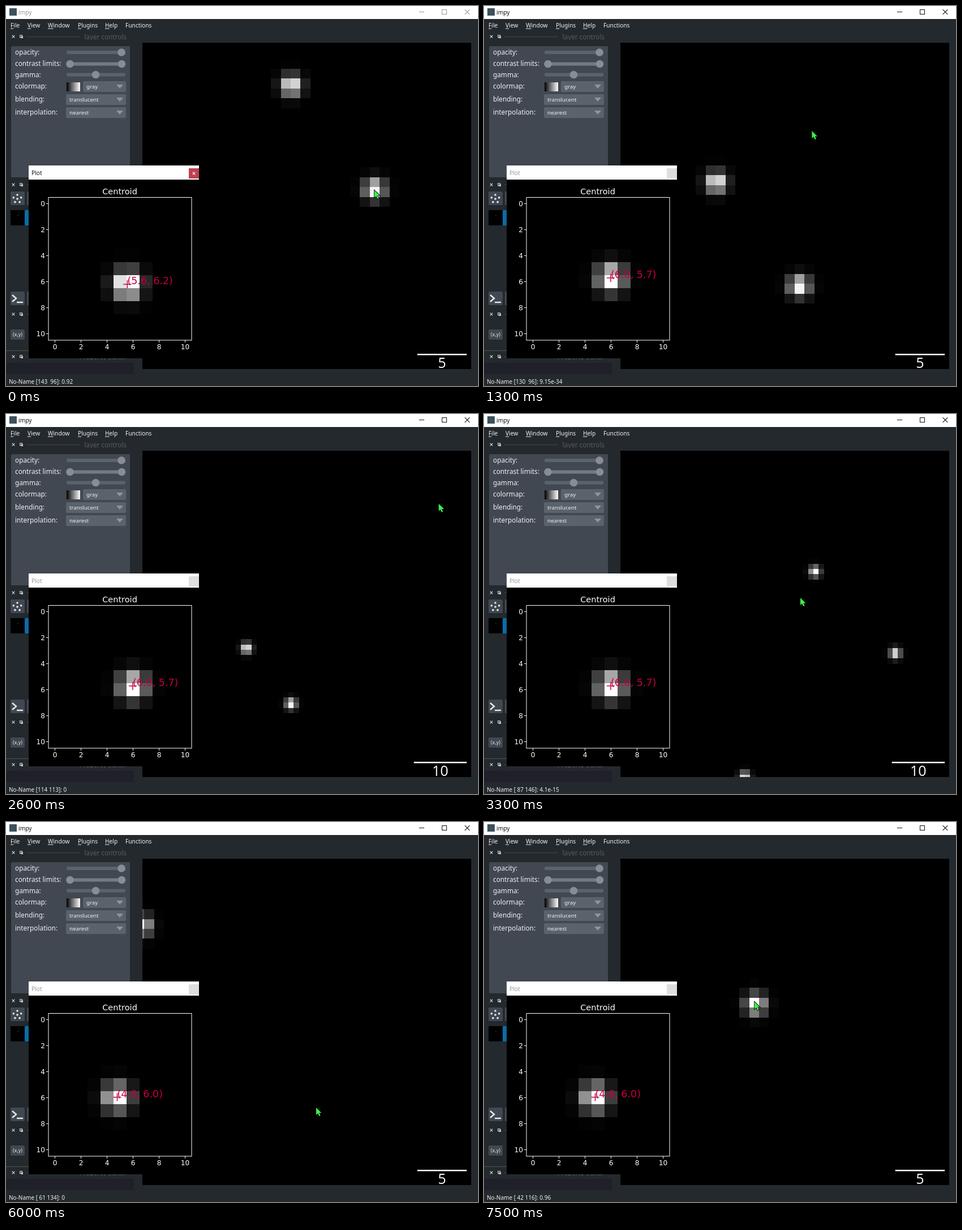
These frames come from a looping animation (834x672 px, 7600 ms). An HTML page with a canvas:

```html
<!DOCTYPE html>
<html lang="en">
<head>
<meta charset="utf-8">
<title>Centroid viewer</title>
<style>
html, body { margin: 0; width: 100%; height: 100%; overflow: hidden; background: #24292e; }
canvas { display: block; }
</style>
</head>
<body>
<canvas id="stage" width="834" height="672"></canvas>
<script>
const g = document.getElementById('stage').getContext('2d');
const LOOP = 7600, CENTER_X = 532, CENTER_Y = 353, NEAR = 17.45, FAR = 9.33;
const UI = '"Noto Sans", sans-serif', PLOT = '"DejaVu Sans", sans-serif';
const BG = '#24292e', PANEL = '#414851', FIELD = '#5a626c', KNOB = '#868e93';

// Gaussian spots: row, column
const spots = {
  a: [132.2, 87.56], b: [142.71236, 95.97774], d: [81.962, 148.7834],
  e: [97.5, 164], f: [120.95, 135.45], h: [42.143, 116.143]
};
// Plot updates: start, spot, crop origin, console message
const plots = [
  { at: 0, spot: spots.a, row: 126, col: 82 },
  { at: 400, spot: spots.b, row: 137, col: 90, until: 900,
    message: "'func' returned (5.71236063632516, 5.977741071187531)" },
  { at: 4500, spot: spots.d, row: 76, col: 144, until: 4650,
    message: "'func' returned (5.96200418273651, 4.783402917365284)" }
];

// The view follows from the user's gestures: x, y is the pointer,
// col, row the cell at the viewer's centre, density the cells per pixel
const now = { t: 0, x: 651, y: 326, col: 89.16, row: 144.38, density: 1 / NEAR };
const keys = [{ ...now }];

function gesture(start, end, change) {
  keys.push({ ...now, t: start });
  keys.push({ ...Object.assign(now, change, { t: end }) });
}

const move = (start, end, x, y) => gesture(start, end, { x, y });

function zoom(start, end, scale) {
  const shift = now.density - 1 / scale;
  gesture(start, end, {
    density: 1 / scale,
    col: now.col + (now.x - CENTER_X) * shift,
    row: now.row + (now.y - CENTER_Y) * shift
  });
}

// Equal strokes, each dragging the image by dx, dy and ending at x, y
function pan(start, end, x, y, dx, dy, strokes) {
  const step = (end - start) / strokes / 2;
  for (let t = start; t < end; t += 2 * step) {
    move(t, t + step, x - dx, y - dy);
    gesture(t + step, t + 2 * step, {
      x, y, col: now.col - dx * now.density, row: now.row - dy * now.density
    });
  }
}

pan(800, 1650, 552, 271, -93.7, 171, 2);
move(1700, 1900, 549, 336);
zoom(2000, 2400, FAR);
pan(2400, 3200, 559, 325, -205.6, 166.3, 2);
move(3300, 3400, 559, 322);
zoom(3400, 3900, NEAR);
move(3900, 4250, 611, 241);
move(4450, 4650, 429, 202);
pan(4800, 5800, 548, 505, 100.2, 318.8, 2);
pan(6050, 6700, 561, 389, 241.7, 139.1, 1);
move(6700, 7300, 478, 318);

function stateAt(t) {
  const i = keys.findIndex(k => k.t > t);
  if (i < 1) return i < 0 ? now : keys[0];
  const a = keys[i - 1], b = keys[i];
  const u = (t - a.t) / (b.t - a.t), e = u * u * (3 - 2 * u);
  return Object.fromEntries(Object.keys(a).map(k => [k, a[k] + (b[k] - a[k]) * e]));
}

const intensity = ([r, c], row, col) => Math.exp(-((row - r) ** 2) - (col - c) ** 2);

function box(x, y, w, h, color) {
  g.fillStyle = color;
  g.fillRect(x, y, w, h);
}

function text(s, x, y, size, color = '#f0f1f2', align = 'left', font = UI) {
  g.font = `${size}px ${font}`;
  g.fillStyle = color;
  g.textAlign = align;
  g.fillText(s, x, y);
}

function path(points, color, width = 1) {
  g.beginPath();
  points.forEach(([x, y]) => g.lineTo(x, y));
  g.strokeStyle = color;
  g.lineWidth = width;
  g.stroke();
}

function disc(x, y, r, color) {
  g.fillStyle = color;
  g.beginPath();
  g.arc(x, y, r, 0, 7);
  g.fill();
}

function cross(x, y, r, color, width) {
  path([[x - r, y - r], [x + r, y + r]], color, width);
  path([[x + r, y - r], [x - r, y + r]], color, width);
}

function rounded(x, y, w, h, color, r = 2) {
  g.fillStyle = color;
  g.beginPath();
  g.roundRect(x, y, w, h, r);
  g.fill();
}

// Cells around a spot; place(row, col) gives a cell's centre
function drawCells(spot, size, gain, place) {
  const r0 = Math.round(spot[0]), c0 = Math.round(spot[1]);
  for (let r = r0 - 3; r <= r0 + 3; r++) for (let c = c0 - 3; c <= c0 + 3; c++) {
    const v = Math.min(255, Math.round(255 * gain * intensity(spot, r, c)));
    if (v < 2) continue;
    const [x, y] = place(r, c), h = size / 2;
    const x0 = Math.round(x - h), y0 = Math.round(y - h);
    box(x0, y0, Math.round(x + h) - x0, Math.round(y + h) - y0, `rgb(${v},${v},${v})`);
  }
}

function drawTitleBar(active) {
  const ink = active ? '#111' : '#999';
  box(0, 0, 834, 23, '#fff');
  box(6, 4, 13, 13, '#3b525c');
  text('impy', 22, 15, 10.2, ink);
  path([[730, 10.5], [739, 10.5]], ink);
  g.strokeRect(770.5, 6.5, 8, 8);
  cross(815, 10.5, 4.3, ink, 1.1);
}

function drawDockHeader(y, title) {
  cross(13, y, 2.3, '#d5d7d9', 1.2);
  g.strokeStyle = '#c5c8ca';
  g.lineWidth = 1;
  g.strokeRect(24.5, y - 2.5, 4, 4);
  g.strokeRect(26.5, y - 0.5, 3, 3);
  path([[36, y + 0.5], [131, y + 0.5]], '#3e454d');
  if (title) {
    text(title, 213, y + 5, 11.7, '#565c63', 'right');
    box(130, y + 6, 90, 5, BG);
  }
}

function drawCombo(x, y, label) {
  rounded(x, y, 212 - x, 19, FIELD);
  text(label, x + 6, y + 12.5, 9.7);
  g.fillStyle = '#8d969d';
  g.beginPath();
  g.moveTo(195, y + 6);
  g.lineTo(207, y + 6);
  g.lineTo(201, y + 13);
  g.fill();
}

function drawSlider(y, color, ...knobs) {
  rounded(107, y - 3, 104, 6, color);
  knobs.forEach(x => disc(x, y, 6.8, KNOB));
}

function drawMenu() {
  [['File', 8], ['View', 38], ['Window', 74], ['Plugins', 127], ['Help', 175], ['Functions', 211]]
    .forEach(([label, x], i) => {
      text(label, x, 38, 10.2);
      if (i < 5) box(x, 39.5, g.measureText(label[0]).width, 1, '#f0f1f2');
    });
}

function drawLayerControls() {
  drawDockHeader(54, 'layer controls');
  rounded(9, 71, 210, 232, PANEL);
  ['opacity:', 'contrast limits:', 'gamma:', 'colormap:', 'blending:', 'interpolation:']
    .forEach((s, i) => text(s, 16, 86 + 20 * i + 3 * Math.max(0, i - 3), 11.8));
  drawSlider(82, FIELD, 204);
  drawSlider(102.5, '#727b84', 113, 204.5);
  drawSlider(121.5, FIELD, 158.5);
  const ramp = g.createLinearGradient(107, 0, 131, 0);
  ramp.addColorStop(0, '#000');
  ramp.addColorStop(1, '#fff');
  box(107, 135, 24, 16, ramp);
  drawCombo(136, 133, 'gray');
  drawCombo(106, 156, 'translucent');
  drawCombo(106, 179, 'nearest');
}

function drawDocks() {
  const ink = '#e8eaeb';
  drawDockHeader(316);
  drawDockHeader(545);
  for (const y of [328, 505]) {
    rounded(8, y, 25, 24, PANEL);
    box(37, y, 4, 24, PANEL);
  }
  disc(20, 341, 1.8, ink);
  for (let a = -Math.PI / 2; a < 4; a += Math.PI * 0.4)
    disc(20 + 7 * Math.cos(a), 341 + 7 * Math.sin(a), 1.8, ink);
  box(8, 361, 25, 27, '#000');
  box(20, 370, 2, 1, '#444');
  box(33, 361, 8, 27, '#0b6ca6');
  path([[11, 511], [18, 517], [11, 523]], ink, 2.4);
  path([[19, 524], [30, 524]], ink, 2.4);
  rounded(8, 572, 25, 18, PANEL);
  text('(x,y)', 20.5, 584, 8.8, ink, 'center');
  box(0, 609, 41, 1, '#4a5a50');
  drawDockHeader(620, 'Property editor');
  box(0, 631, 226, 20, '#1f2029');
}

function drawViewer({ col, row, density }) {
  const scale = 1 / density;
  g.save();
  g.beginPath();
  g.rect(241, 65, 581, 577);
  g.clip();
  box(241, 65, 581, 577, '#000');
  for (const spot of Object.values(spots))
    drawCells(spot, scale, 1 / 0.96,
      (r, c) => [CENTER_X + (c - col) * scale, CENTER_Y + (r - row) * scale]);
  const units = scale > 13 ? 5 : 10, w = units * scale;
  box(814 - w, 615, w, 2.5, '#fff');
  text(units, 814 - w / 2, 639.5, 25, '#fff', 'center', '"Open Sans", sans-serif');
  g.restore();
}

function drawPlot({ spot, row, col }, active) {
  const px = c => 86.5 + 23 * c, py = r => 349.5 + 23 * r;
  box(40, 282, 301, 341, '#000');
  box(40, 282, 301, 25, '#fff');
  text('Plot', 45, 298.5, 10.2, active ? '#111' : '#999');
  box(323, 287, 18, 18, active ? '#bf4050' : '#dedede');
  if (active) cross(332, 296, 2.3, '#fff', 1.2);
  text('Centroid', 201, 333, 14.5, '#fff', 'center', PLOT);

  const [r, c] = [spot[0] - row, spot[1] - col];
  const peak = intensity([r, c], Math.round(r), Math.round(c));
  drawCells([r, c], 23, 1 / peak, (i, j) => [px(j), py(i)]);
  g.strokeStyle = '#fff';
  g.lineWidth = 1;
  g.strokeRect(75, 338.5, 253, 252.5);
  for (let k = 0; k <= 10; k += 2) {
    path([[71, py(k)], [75, py(k)]], '#fff');
    path([[px(k), 591], [px(k), 595]], '#fff');
    text(k, 69, py(k) + 4.5, 12.1, '#fff', 'right', PLOT);
    text(k, px(k), 607, 12.1, '#fff', 'center', PLOT);
  }
  const x = px(c), y = py(r), ink = '#c4003e';
  path([[x - 7, y], [x + 7, y]], ink, 1.5);
  path([[x, y - 7], [x, y + 7]], ink, 1.5);
  text(`(${c.toFixed(1)}, ${r.toFixed(1)})`, x, y, 17.5, ink, 'left', PLOT);
}

// The readout trails the pointer slightly and has single precision
function statusAt(t, view) {
  const { x, y } = stateAt(t - 100);
  const row = Math.round(view.row + (y - CENTER_Y) * view.density);
  const col = Math.round(view.col + (x - CENTER_X) * view.density);
  const sum = Object.values(spots).reduce((s, p) => s + intensity(p, row, col), 0);
  const value = Number(Math.fround(sum).toPrecision(3));
  const width = Math.max(`${row}`.length, `${col}`.length);
  const [r, c] = [row, col].map(n => `${n}`.padStart(width));
  return `No-Name [${r} ${c}]: ${value}`;
}

function drawPointer({ x, y }) {
  g.beginPath();
  [[0, 0], [0, 13], [3, 10.3], [5.3, 15], [7.6, 14], [5.4, 9.4], [9.5, 9.4]]
    .forEach(([dx, dy]) => g.lineTo(x + dx, y + dy));
  g.closePath();
  g.strokeStyle = '#000';
  g.lineWidth = 1.6;
  g.stroke();
  g.fillStyle = '#3cf04c';
  g.fill();
}

function draw(t) {
  const state = stateAt(t);
  const plot = plots.filter(p => p.at <= t).pop();
  const plotActive = t < 900 || (t >= 4500 && t < 4650);
  box(0, 0, 834, 672, BG);
  drawTitleBar(!plotActive);
  drawMenu();
  drawLayerControls();
  drawDocks();
  drawViewer(state);
  drawPlot(plot, plotActive);
  text(t < plot.until ? plot.message : statusAt(t, state), 5, 668, 10);
  drawPointer(state);
}

function tick() {
  draw(performance.now() % LOOP);
  requestAnimationFrame(tick);
}
tick();
</script>
</body>
</html>
```
